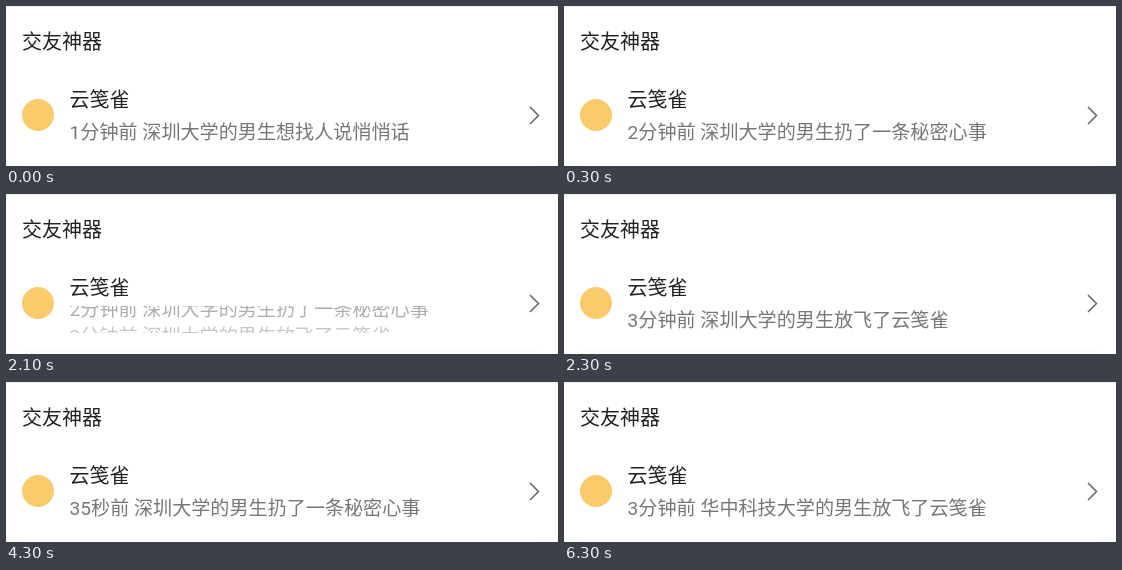
An HTML page that plays this animation: 552 by 160 pixels, repeating every 7.5 s.

```html
<!DOCTYPE html>
<html lang="zh-CN">
<head>
<meta charset="utf-8">
<title>交友神器</title>
<style>
  html, body { margin: 0; width: 100%; height: 100%; overflow: hidden; background: #fff; }
  svg { display: block; width: 552px; height: 160px; }
  text { font-family: Roboto, "Noto Sans CJK SC", "Noto Sans CJK", sans-serif; white-space: pre; }
  .title { font-size: 20px; fill: #222; }
  .news { font-size: 19.1px; fill: #777; }
</style>
</head>
<body>
<svg viewBox="0 0 552 160">
  <defs>
    <clipPath id="slot"><rect x="60" y="112" width="450" height="27"/></clipPath>
  </defs>
  <rect width="552" height="160" fill="#fff"/>
  <rect width="552" height="1" fill="#ededed"/>
  <rect x="16" y="156" width="518" height="1" fill="#f6f6f6"/>
  <text class="title" x="16" y="43">交友神器</text>
  <circle cx="32" cy="109" r="16" fill="#facb6b"/>
  <text class="title" x="63.6" y="101">云笺雀</text>
  <g clip-path="url(#slot)">
    <text class="news" id="current" x="63.6"></text>
    <text class="news" id="next" x="63.6"></text>
  </g>
  <path d="M524 101l8.5 8.5-8.5 8.5" fill="none" stroke="#666" stroke-width="1.5"/>
  <path id="cursor" d="M.8 1v18.5l4.3-4 3.3 7.3 3.2-1.4-3.3-7.1h5.7z"
        fill="#fff" stroke="#25304d" stroke-width="1.3" stroke-linejoin="round"/>
</svg>
<script>
  const LOOP = 7500, TICK = 100, ROW = 27, BASELINE = 132.6;
  const news = [
    '1分钟前 深圳大学的男生想找人说悄悄话',
    '2分钟前 深圳大学的男生扔了一条秘密心事',
    '3分钟前 深圳大学的男生放飞了云笺雀',
    '35秒前 深圳大学的男生扔了一条秘密心事',
    '3分钟前 华中科技大学的男生放飞了云笺雀'
  ];
  // Start time of each roll and the row offset at every tick
  const roll = [11, 23, 27];
  const rolls = [[100, roll], [2100, roll], [4100, roll], [6000, [1, ...roll]]];
  const cursorPath = [[1700, 256, 108], [1800, 284, 59]];

  const $ = id => document.getElementById(id);
  const current = $('current'), next = $('next'), cursor = $('cursor');

  function place(el, label, y, opacity) {
    if (el.textContent !== label) el.textContent = label;
    el.setAttribute('y', y);
    el.setAttribute('opacity', opacity);
  }

  function draw(t) {
    let row = 0, shift = 0;
    rolls.forEach(([start, steps], i) => {
      if (t < start) return;
      const step = Math.min(Math.floor((t - start) / TICK), steps.length - 1);
      row = i;
      shift = steps[step];
      if (shift === ROW) { row++; shift = 0; }
    });
    const p = shift / ROW;
    place(current, news[row], BASELINE - shift, 1 - p);
    place(next, shift ? news[row + 1] : '', BASELINE + ROW - shift, p);

    const spot = cursorPath.find(([at]) => t >= at && t < at + TICK);
    cursor.style.display = spot ? '' : 'none';
    if (spot) cursor.setAttribute('transform', `translate(${spot[1]} ${spot[2]})`);
  }

  function tick() {
    draw(performance.now() % LOOP);
    requestAnimationFrame(tick);
  }
  tick();
</script>
</body>
</html>
```
